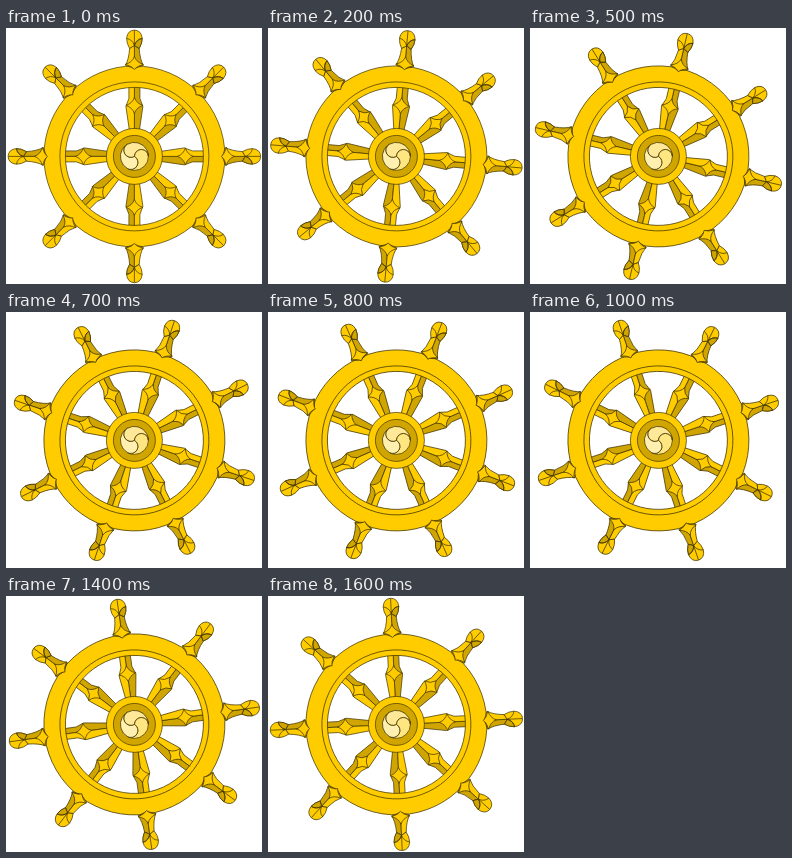
Write an HTML page with a canvas that moves like this. It is 256 px wide and 256 px high and loops after 1700 ms.

```html
<!DOCTYPE html>
<html lang="en">
<head>
<meta charset="utf-8">
<title>Turning wheel</title>
<style>
html, body { margin: 0; width: 100%; height: 100%; overflow: hidden; background: #fff; }
canvas { display: block; width: 256px; height: 256px; }
</style>
</head>
<body>
<canvas id="stage"></canvas>
<script>
const GOLD = '#ffcc00', DARK = '#d0a500', INK = '#403400';
const SWIRL = ['#ffe680', '#fff0b0', '#ffe998'];
const STEP = 100, STEPS = 17, SPOKES = 8, TAU = Math.PI * 2;
const CENTER = 128.4;

const canvas = document.getElementById('stage');
const ratio = window.devicePixelRatio || 1;
canvas.width = canvas.height = 256 * ratio;
const ctx = canvas.getContext('2d');

// Spoke paths point upwards from the hub; negative y is outwards.
const spokeHalf = new Path2D('M0 -26 L5 -26 L8.5 -50 L5.5 -58 L5.5 -70 L0 -70 Z');
const handleHalf = new Path2D('M0 -88 L9 -91 Q5.5 -97 4.8 -108 L0 -111 Z');
const knob = new Path2D(
  'M-4.8 -108 Q-7.8 -113 -7.8 -118 Q-7 -126 0 -126.3 Q7 -126 7.8 -118 Q7.8 -113 4.8 -108 L0 -111 Z');
const knobShade = new Path2D('M0 -111 L4.8 -108 Q7.8 -113 7.8 -118 Q2 -117 0 -111 Z');
const knobLines = new Path2D('M-7.8 -118 Q-2 -117 0 -111 Q2 -117 7.8 -118 M0 -111 L0 -126');
const spokeStar = star(51, 8.5, 8, 8);
const handleStar = star(92, 9, 8, 5);

function star(r, width, outer, inner) {
  return new Path2D(
    `M0 ${-r - outer} Q2 ${-r - 2} ${width} ${-r} Q2 ${-r + 2} 0 ${-r + inner}` +
    `Q-2 ${-r + 2} ${-width} ${-r} Q-2 ${-r - 2} 0 ${-r - outer} Z`);
}

function shape(path, fill) {
  ctx.fillStyle = fill;
  ctx.fill(path);
  ctx.stroke(path);
}

function disc(radius, fill) {
  const path = new Path2D();
  path.arc(0, 0, radius, 0, TAU);
  shape(path, fill);
}

// The clockwise facet is the darker one.
function facets(path) {
  shape(path, DARK);
  ctx.save();
  ctx.scale(-1, 1);
  shape(path, GOLD);
  ctx.restore();
}

function repeatAround(count, draw) {
  for (let i = 0; i < count; i++) {
    ctx.save();
    ctx.rotate(i * TAU / count);
    draw(i);
    ctx.restore();
  }
}

function spoke() {
  facets(spokeHalf);
  shape(spokeStar, GOLD);
}

function handle() {
  facets(handleHalf);
  shape(handleStar, GOLD);
  shape(knob, GOLD);
  shape(knobShade, DARK);
  ctx.stroke(knobLines);
}

function rim() {
  const ring = new Path2D();
  ring.arc(0, 0, 90.5, 0, TAU);
  ring.moveTo(69, 0);
  ring.arc(0, 0, 69, 0, TAU, true);
  ctx.fillStyle = GOLD;
  ctx.fill(ring, 'evenodd');
  ctx.stroke(ring);
  ctx.beginPath();
  ctx.arc(0, 0, 74.5, 0, TAU);
  ctx.stroke();
}

function hub() {
  disc(28, GOLD);
  disc(21, DARK);
  // Three comma-shaped fields, each bounded by two half circles and the edge.
  repeatAround(3, i => {
    const field = new Path2D();
    field.arc(7, 0, 7, Math.PI, 0);
    field.arc(0, 0, 14, 0, TAU / 3);
    field.arc(7 * Math.cos(TAU / 3), 7 * Math.sin(TAU / 3), 7, TAU / 3, TAU / 3 - Math.PI, true);
    shape(field, SWIRL[i]);
  });
}

function draw(time) {
  const step = Math.floor(time / STEP) % STEPS;
  ctx.setTransform(ratio, 0, 0, ratio, 0, 0);
  ctx.fillStyle = '#fff';
  ctx.fillRect(0, 0, 256, 256);
  ctx.translate(CENTER, CENTER);
  ctx.strokeStyle = INK;
  ctx.lineWidth = 0.7;
  ctx.lineJoin = 'round';

  ctx.save();
  ctx.rotate(step / STEPS * TAU / SPOKES);
  repeatAround(SPOKES, spoke);
  rim();
  repeatAround(SPOKES, handle);
  ctx.restore();
  hub();
}

const start = performance.now();
function tick() {
  draw(performance.now() - start);
  requestAnimationFrame(tick);
}
tick();
</script>
</body>
</html>
```
